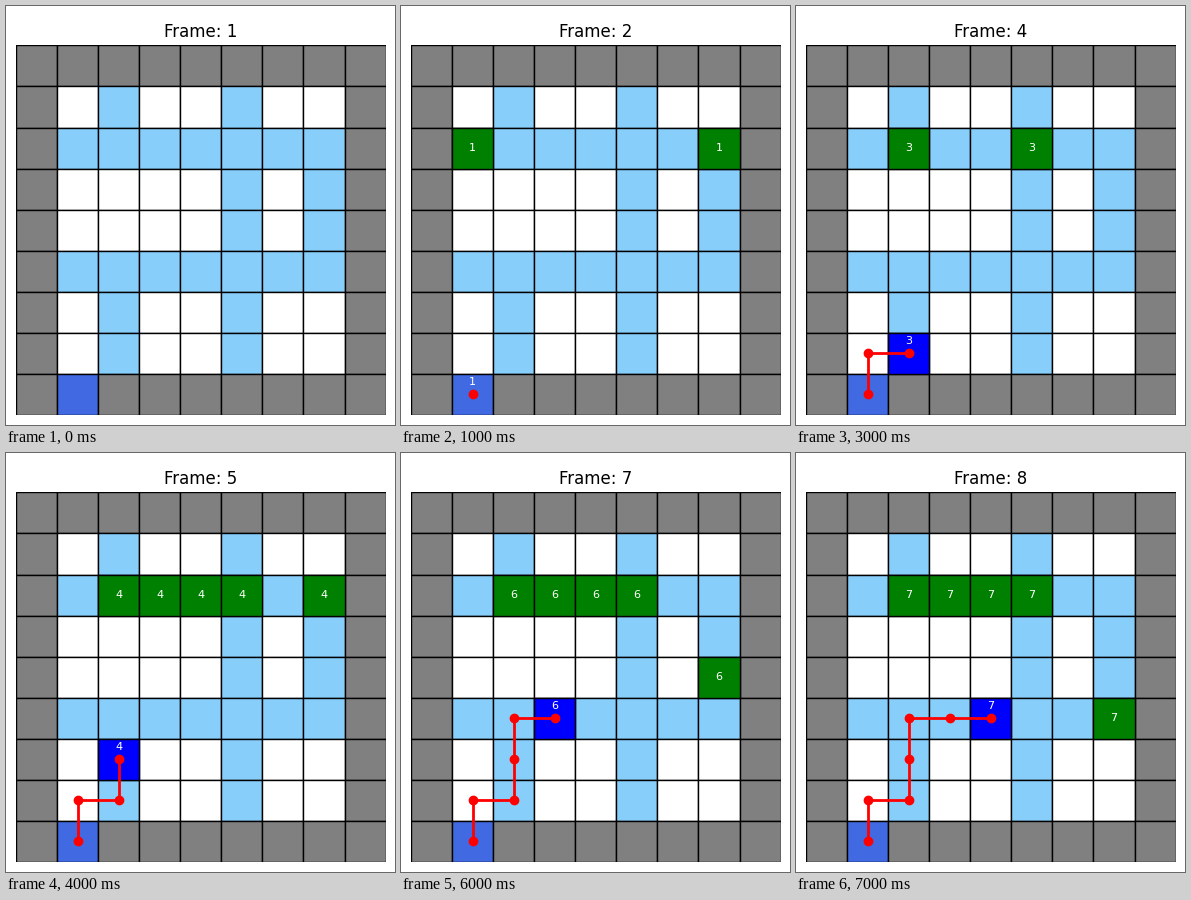
These frames come from a looping animation (389 px wide and 419 px high, 8 s). A matplotlib script:

```python
import matplotlib.pyplot as plt
from matplotlib.animation import FuncAnimation
from matplotlib.patches import Rectangle

W, H, DPI = 389, 419, 100
SIDE = 369.6   # drawn grid size in pixels
PAD = 10
N = 9
STEPS = 8

# '#' wall, '.' empty, '=' road, 'S' start
GRID = [
    "#########",
    "#.=..=..#",
    "#=======#",
    "#....=.=#",
    "#....=.=#",
    "#=======#",
    "#.=..=..#",
    "#.=..=..#",
    "#S#######",
]
COLORS = {"#": "gray", ".": "white", "=": "lightskyblue", "S": "royalblue"}

# agent route as (column, row)
ROUTE = [(1, 8), (1, 7), (2, 7), (2, 6), (2, 5), (3, 5), (4, 5)]

fig = plt.figure(figsize=(W / DPI, H / DPI), dpi=DPI, facecolor="white")
ax = fig.add_axes([PAD / W, PAD / H, SIDE / W, SIDE / H])


def obstacles(step):
    """Two blocks close in along the upper road, join, and a third goes down."""
    if step == 0:
        return []
    left, right = min(step, 2), max(8 - step, 5)
    if step < 4:
        return [(left, 2), (right, 2)]
    return [(c, 2) for c in range(2, 6)] + [(7, step - 2)]


def cell(col, row, color):
    ax.add_patch(Rectangle((col, row), 1, 1, facecolor=color,
                           edgecolor="black", linewidth=1))


def label(x, y, value):
    ax.text(x, y, str(value), color="white", fontsize=8,
            ha="center", va="center")


def draw(step):
    ax.clear()
    ax.set_xlim(0, N)
    ax.set_ylim(N, 0)
    ax.axis("off")
    ax.set_title(f"Frame: {step + 1}", fontsize=12)

    for row, line in enumerate(GRID):
        for col, kind in enumerate(line):
            cell(col, row, COLORS[kind])

    for col, row in obstacles(step):
        cell(col, row, "green")
        label(col + 0.5, row + 0.5, step)

    if step > 0:
        col, row = ROUTE[step - 1]
        if GRID[row][col] != "S":
            cell(col, row, "blue")
        label(col + 0.5, row + 0.2, step)
        xs = [c + 0.5 for c, _ in ROUTE[:step]]
        ys = [r + 0.5 for _, r in ROUTE[:step]]
        ax.plot(xs, ys, color="red", marker="o", linewidth=2, markersize=6)
    return []


anim = FuncAnimation(fig, draw, frames=STEPS, init_func=lambda: draw(0),
                     interval=1000, repeat=True, repeat_delay=0)
plt.show()
```
